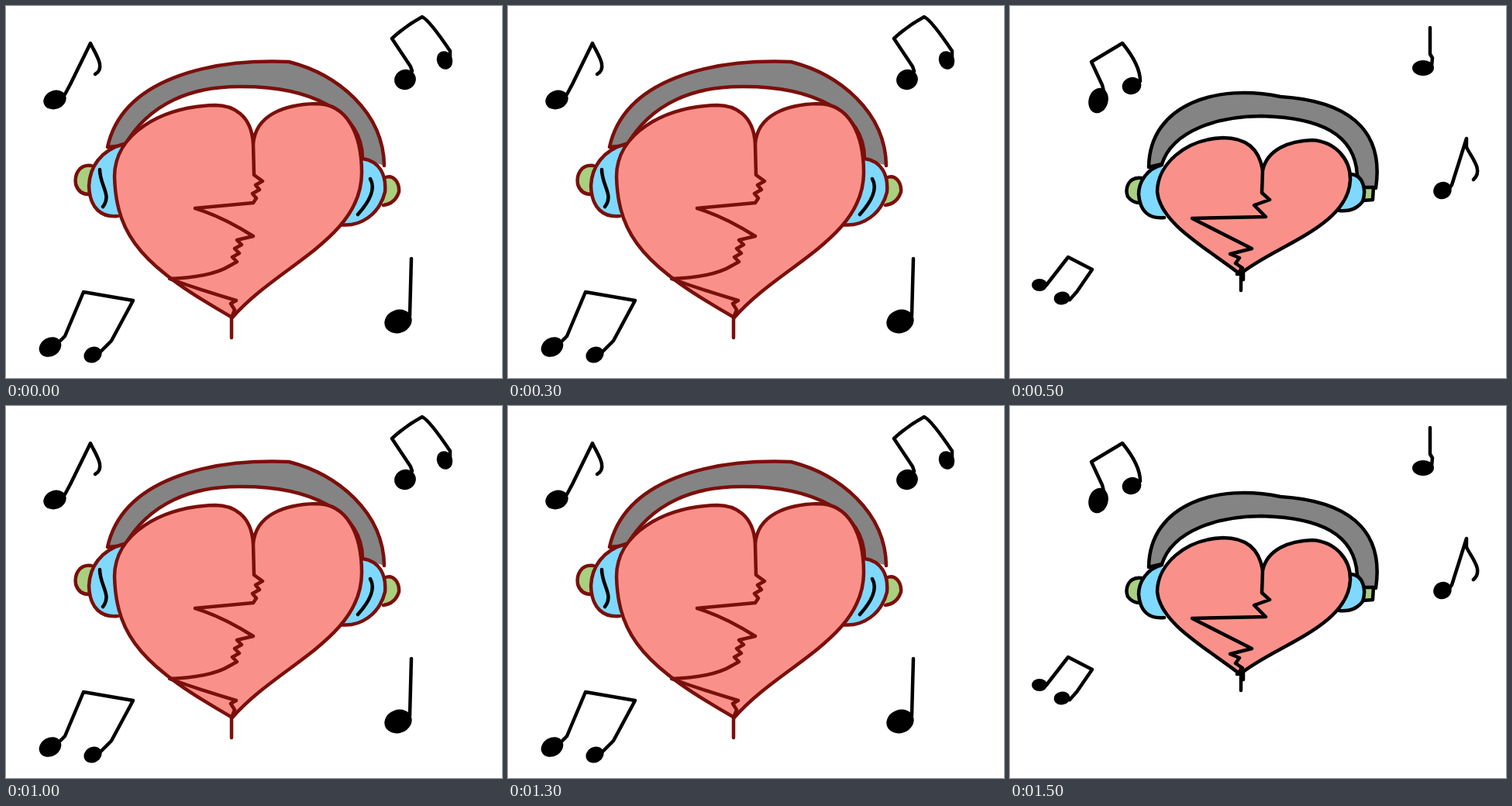
Write an HTML page that moves like this. It is 640x480 px and loops after 2 s.

```html
<!DOCTYPE html>
<html lang="en">
<head>
<meta charset="utf-8">
<title>Heart with headphones</title>
<style>
html, body { margin: 0; width: 100%; height: 100%; overflow: hidden; background: #fff; }
svg { display: block; width: 100vw; height: 100vh; }
path { stroke-linecap: round; stroke-linejoin: round; stroke-width: 4.5; }
</style>
</head>
<body>
<svg id="stage" viewBox="0 0 640 480"></svg>
<script>
const BEAT = 500;
const HEART = '#f9918a', BAND = '#848484', CUP = '#7fd9ff', NUB = '#a8d080';
const stage = document.getElementById('stage');

function add(parent, tag, attrs) {
  const el = document.createElementNS('http://www.w3.org/2000/svg', tag);
  for (const key in attrs) el.setAttribute(key, attrs[key]);
  parent.appendChild(el);
  return el;
}

// A run of equal teeth: step out, step back, n times
const teeth = (out, back, n) => `l${out} ${back}`.repeat(n);

function pose(ink, build) {
  const g = add(stage, 'g', {});
  const shape = (d, fill) => add(g, 'path', { d, fill, stroke: ink });
  const line = (d, stroke = ink) => add(g, 'path', { d, fill: 'none', stroke });
  const note = (stem, ...heads) => {
    line(stem, '#000');
    for (const [cx, cy, rx, ry, turn = -20] of heads)
      add(g, 'ellipse', { cx, cy, rx, ry, transform: `rotate(${turn} ${cx} ${cy})` });
  };
  build(shape, line, note);
  return g;
}

const big = pose('#7b0f0b', (shape, line, note) => {
  shape(`M488,206 C487,137 428,88 365,72 C260,68 150,95 131,182
    L153,180 C185,125 240,103 305,104 C390,104 460,135 460,197`, BAND);
  shape('M110,206 C94,204 88,218 90,230 Q94,243 107,243', NUB);
  shape('M488,222 C500,216 508,228 507,240 Q502,255 487,257', NUB);
  shape('M152,178 C122,186 108,208 107,232 C108,262 124,273 144,271', CUP);
  shape('M460,197 C482,200 491,218 489,240 C482,268 458,286 430,282', CUP);
  shape(`M319,178 C317,140 292,128 270,128 C200,130 140,165 140,220
    C142,300 180,338 292,402 C350,335 459,300 459,215
    C459,165 440,126 400,126 C360,127 322,140 319,178`, HEART);
  line(`M319,178 L320,218 331,226 ${teeth('-9,5', '5,6', 2)} L319,254 244,261
    Q280,272 319,297 L298,302 ${teeth('6,6', '-9,5', 3)}
    Q265,350 211,352 Q250,366 297,380 L290,384 295,392 291,402 V428`);
  line('M121,211 C121,232 137,244 125,259', '#000');
  line('M470,223 Q480,240 454,269', '#000');

  note('M76,114 L83,101 109,48 C114,60 130,80 115,88', [63, 121, 15, 12]);
  note('M524,84 L522,78 498,42 Q515,26 537,14 Q546,18 573,58 V68',
    [515, 95, 14, 13], [566, 70, 10, 12]);
  note('M70,432 L76,426 100,369 164,380 136,432 122,446',
    [57, 440, 15, 12, -30], [112, 450, 12, 10, -30]);
  note('M523,326 L521,400', [506, 407, 18, 15]);
});

const small = pose('#000', (shape, line, note) => {
  shape(`M472,235 C484,155 430,122 349,117 C270,100 180,125 179,208
    L196,204 C210,160 270,142 325,142 C400,144 445,165 448,218 L458,236`, BAND);
  shape('M170,222 C152,220 148,236 152,246 Q158,254 168,254', NUB);
  shape('M457,234 H469 L468,250 455,251', NUB);
  shape('M196,205 C176,210 166,228 166,243 C168,266 180,275 199,273', CUP);
  shape('M440,217 C456,218 460,238 455,252 Q445,266 425,264', CUP);
  shape(`M326,212 C321,180 300,170 275,170 C225,172 190,205 190,240
    C194,280 250,310 297,346 C340,310 436,285 439,225
    C440,198 420,175 390,173 C360,174 332,185 326,212`, HEART);
  line(`M326,212 L325,241 335,250 315,257 330,272 235,274 312,313 284,320
    296,325 291,332 300,338 293,346 301,344 V353 M298,338 V367`);

  note('M121,110 L119,102 105,72 145,48 Q168,76 168,97',
    [114, 122, 12.5, 16.5, 15], [157, 103, 12.5, 11]);
  note('M542,28 V62 L545,67 544,78', [533, 80, 14, 10, 0]);
  note('M566,236 L570,231 589,171 V182 C594,194 612,212 598,224', [558, 238, 12, 11, -30]);
  note('M47,360 L75,324 106,340 86,369 77,379',
    [38, 360, 10, 8, 0], [67, 377, 10.5, 8.5, -10]);
});

const poses = [big, small];

function show(ms) {
  const now = Math.floor(ms / BEAT) % poses.length;
  poses.forEach((g, i) => g.setAttribute('visibility', i === now ? 'visible' : 'hidden'));
}

let start;
function tick(t) {
  start ??= t;
  show(t - start);
  requestAnimationFrame(tick);
}
show(0);
requestAnimationFrame(tick);
</script>
</body>
</html>
```
